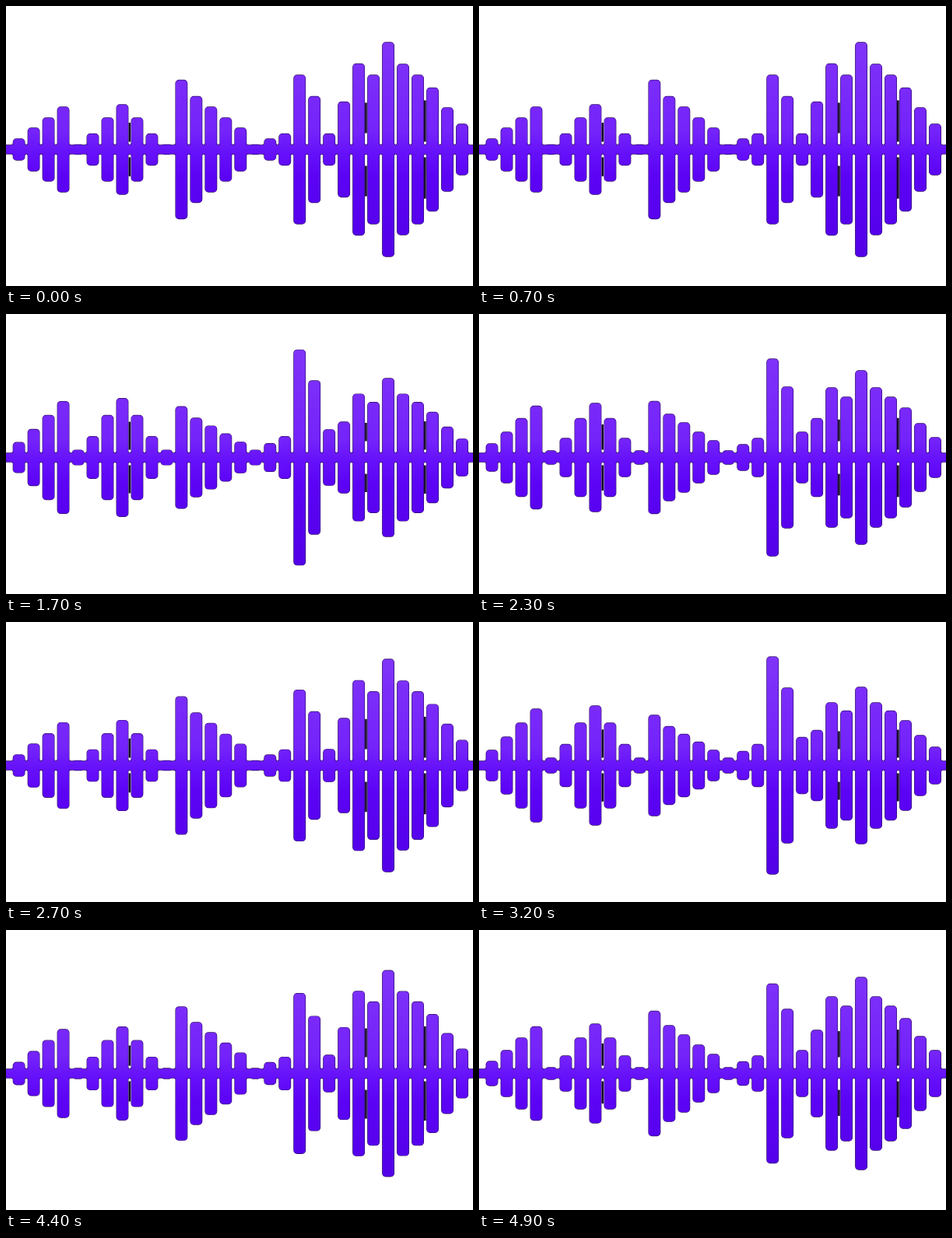
An HTML page with a canvas for the animation above (5 s loop, 600x360 px).

```html
<!DOCTYPE html>
<html lang="en">
<head>
<meta charset="utf-8">
<title>Sound wave</title>
<style>
html, body { margin: 0; width: 100%; height: 100%; overflow: hidden; background: #fff; }
canvas { display: block; }
</style>
</head>
<body>
<canvas id="stage" width="600" height="360"></canvas>
<script>
const ctx = document.getElementById('stage').getContext('2d');
const LOOP = 5000, STEP = 100, MID = 184.5, BAR = 14.6;

// Half heights of the 31 bars in four poses
const POSES = [
  [13.5, 27.5, 40.5, 54.5, 6, 20, 40.5, 57.5, 40.5, 20, 6, 89, 68, 54.5, 40.5, 27.5,
    6, 13.5, 20, 95.5, 68, 20, 61, 110, 95.5, 137.5, 109.5, 95.5, 79, 53.5, 32.5],
  [15.5, 29.5, 45.5, 60, 7.5, 22.5, 45.5, 63.5, 45.5, 22.5, 7.5, 80, 61.5, 49.5, 36.5, 24.5,
    7.5, 15, 22.5, 115, 82.5, 29.5, 55.5, 98.5, 86.5, 123.5, 98.5, 86.5, 70.5, 47.5, 29.5],
  [17.5, 32.5, 50, 66, 8.5, 24.5, 50, 69.5, 50, 24.5, 8.5, 72, 55.5, 44.5, 32.5, 21.5,
    8.5, 16.5, 24.5, 126.5, 90.5, 32.5, 50, 89.5, 77.5, 111.5, 89.5, 77.5, 63.5, 43.5, 25.5],
  [19.5, 36.5, 54.5, 72.5, 9.5, 27, 54.5, 76.5, 54.5, 27, 9.5, 64.5, 50, 40, 30, 19.5,
    9.5, 18, 27, 139.5, 99.5, 36, 45, 80.5, 70, 100.5, 80.5, 70, 57.5, 38.5, 23.5]
];

// [step, pose]; the pose eases from one key to the next
const KEYS = [
  [0, 0], [3.5, 3.5], [7, 0], [8, -.5], [11, 3.4], [12, 2], [14, 0], [17.5, 3.05],
  [21, 0], [23, 2], [24, 3.4], [28, -.5], [31, 3.4], [32, 3], [35.5, -.5],
  [39, 3], [40, 3.4], [43, -.5], [46, 3], [48, 0], [49, 1], [50, 0]
];

// Dark slits to the right of a bar: [bar, start, share of the lower neighbour]
const SLITS = [[7, 10, .85], [23, 21, .63], [27, 10, .8]];

const fill = ctx.createLinearGradient(0, 45, 0, 324);
fill.addColorStop(0, '#8034f8');
fill.addColorStop(.42, '#7423fa');
fill.addColorStop(.52, '#6510fa');
fill.addColorStop(.62, '#5c03f5');
fill.addColorStop(1, '#5200e6');

const barX = i => 16.6 + 18.98 * i;

function poseAt(step) {
  const n = KEYS.findIndex(k => k[0] > step);
  const [t0, a] = KEYS[n - 1], [t1, b] = KEYS[n];
  const ease = (1 - Math.cos(Math.PI * (step - t0) / (t1 - t0))) / 2;
  return a + (b - a) * ease;
}

function heightsAt(pose) {
  const n = Math.max(0, Math.min(2, Math.floor(pose)));
  return POSES[n].map((h, i) => h + (POSES[n + 1][i] - h) * (pose - n));
}

function block(path, x, w, h, r) {
  path.roundRect(x - w / 2, MID - h, w, h * 2, r);
}

function draw(step) {
  const heights = heightsAt(poseAt(step));
  ctx.fillStyle = '#fff';
  ctx.fillRect(0, 0, 600, 360);

  ctx.fillStyle = '#14042c';
  for (const [i, from, share] of SLITS) {
    const len = Math.min(heights[i], heights[i + 1]) * share - from;
    const x = barX(i) + 8;
    ctx.fillRect(x, MID - from - len, 2.6, len);
    ctx.fillRect(x, MID + from, 2.6, len);
  }

  const wave = new Path2D();
  block(wave, 300, 610, 5.5, 0);
  heights.forEach((h, i) => {
    block(wave, barX(i), BAR, h, 4);
    if (h > 10) block(wave, barX(i), 17.4, 7.5, 3);
  });
  ctx.strokeStyle = '#2a0a66';
  ctx.lineWidth = 1.3;
  ctx.stroke(wave);
  ctx.fillStyle = fill;
  ctx.fill(wave);
}

const start = performance.now();
let last = -1;
function tick() {
  const step = Math.floor((performance.now() - start) % LOOP / STEP);
  if (step !== last) draw(last = step);
  requestAnimationFrame(tick);
}
tick();
</script>
</body>
</html>
```
